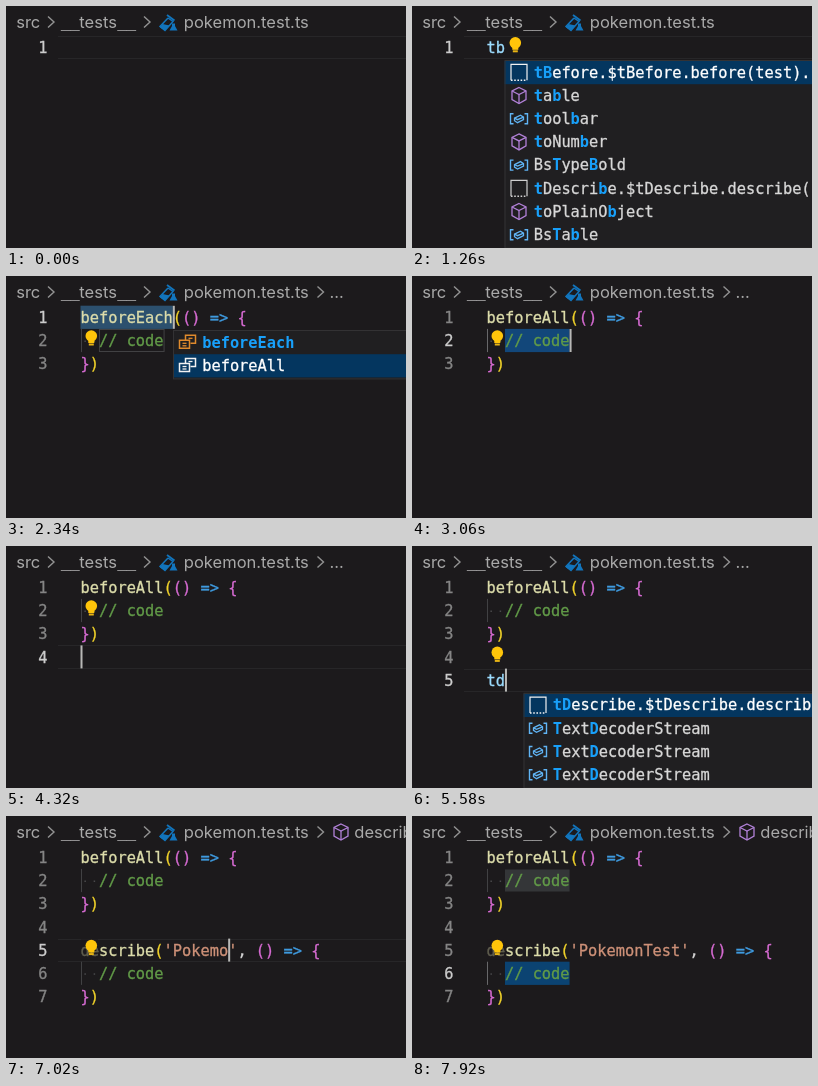
Animation of 400x242 px, one loop 8000 ms. Source, as an HTML page with a canvas:

```html
<!DOCTYPE html>
<html lang="en">
<head>
<meta charset="utf-8">
<title>Test snippets</title>
<style>
html, body { margin: 0; width: 100%; height: 100%; overflow: hidden; background: #1c1a1c; }
canvas { display: block; width: 400px; height: 242px; }
</style>
</head>
<body>
<canvas id="stage"></canvas>
<script>
const LOOP = 8000;
const MONO = '15.33px "DejaVu Sans Mono", monospace';
const UI = '16.55px Inter, sans-serif';
const CW = 9.23, LH = 23.2, LEFT = 74.5;
const BG = '#1c1a1c';

const canvas = document.getElementById('stage');
const ratio = window.devicePixelRatio || 1;
canvas.width = 400 * ratio;
canvas.height = 242 * ratio;
const c = canvas.getContext('2d');

const midY = line => 41.3 + (line - 1) * LH;
const colX = col => LEFT + col * CW;

// drawing helpers
function text(s, x, y, color, font = MONO, align = 'left') {
  c.font = font;
  c.fillStyle = color;
  c.textAlign = align;
  c.fillText(s, x, y);
  if (font === MONO) {
    c.strokeStyle = color;
    c.lineWidth = 0.3;
    c.strokeText(s, x, y);
  }
}
function box(x, y, w, h, color) {
  c.fillStyle = color;
  c.fillRect(x, y, w, h);
}
function path(points, color, width = 1.3, close = false) {
  c.beginPath();
  points.forEach(([x, y]) => c.lineTo(x, y));
  if (close) c.closePath();
  c.strokeStyle = color;
  c.lineWidth = width;
  c.stroke();
}
function shape(points, color) {
  c.beginPath();
  points.forEach(([x, y]) => c.lineTo(x, y));
  c.fillStyle = color;
  c.fill();
}
function at(x, y, draw) {
  c.save();
  c.translate(x, y);
  draw();
  c.restore();
}

// icons, each centred on its own origin
function cube(color) {
  path([[0, -8], [7, -4.5], [7, 4], [0, 8], [-7, 4], [-7, -4.5]], color, 1.3, true);
  path([[-7, -4.5], [0, -1], [7, -4.5]], color, 1.3);
  path([[0, -1], [0, 8]], color, 1.3);
}
function variable(color) {
  path([[-5.5, -5], [-8.5, -5], [-8.5, 5], [-5.5, 5]], color, 1.4);
  path([[5.5, -5], [8.5, -5], [8.5, 5], [5.5, 5]], color, 1.4);
  path([[-4.5, -0.5], [1.5, -3.5], [4.5, -1.5], [4.5, 1], [-1.5, 4], [-4.5, 2]], color, 1.3, true);
  path([[-4.5, -0.5], [-1.5, 1], [4.5, -1.5]], color);
}
function snippet(color) {
  path([[-8, 8], [-8, -8], [8, -8], [8, 8]], color, 1.2);
  c.setLineDash([1.6, 1.6]);
  path([[-8, 8], [8, 8]], color, 1.5);
  c.setLineDash([]);
}
function choice(color) {
  path([[-2, -2], [-2, -7], [8, -7], [8, 1], [3, 1]], color, 1.5);
  path([[-8, -2], [2, -2], [2, 6], [-8, 6]], color, 1.5, true);
  path([[1, -4], [5, -4]], color);
  path([[-5, 1], [-1, 1]], color);
  path([[-5, 3.5], [-1, 3.5]], color);
}
function bulb() {
  c.beginPath();
  c.arc(0, -1.5, 5.8, 0, Math.PI * 2);
  c.fillStyle = '#ffc50a';
  c.fill();
  box(-3, 2.5, 6, 3, '#ffc50a');
  box(-2.5, 6, 5, 2, '#e8b414');
}
function beaker() {
  const blue = '#1275bd';
  path([[1, -4.5], [6, -1], [-2, 8], [-7, 4], [1, -4.5]], blue, 1.5);
  path([[0, -7.5], [7.5, -2]], blue, 1.8);
  shape([[-4.5, 1.5], [2.5, 3], [-2, 8], [-7, 5]], blue);
  shape([[5, 1], [8, 1], [8, 3.5], [10.5, 8], [2.5, 8], [5, 3.5]], blue);
}

const icons = { cube, variable, snippet, choice };
const tints = { cube: '#b180d7', variable: '#60b4f4', snippet: '#d0d0d0', choice: '#e08a2c' };

// icon, label and, where it differs from the query, the order of lit letters
const tbItems = [
  ['snippet', 'tBefore.$tBefore.before(test).'],
  ['cube', 'table'],
  ['variable', 'toolbar'],
  ['cube', 'toNumber'],
  ['variable', 'BsTypeBold'],
  ['snippet', 'tDescribe.$tDescribe.describe('],
  ['cube', 'toPlainObject'],
  ['variable', 'BsTable']
];
const stream = ['variable', 'TextDecoderStream', 'teds'];
const desItems = [['snippet', 'tDescribe.$tDescribe.describe('], stream, stream, stream];
const hooks = [['choice', 'beforeEach'], ['choice', 'beforeAll']];

// timeline: every step changes only the listed fields
const block = head => [head + '(() => {', '  // code', '})'];
const all = block('beforeAll');
const suite = name => [...all, '', `describe('${name}', () => {`, '  // code', '})'];
const list = (items, query, x, line, pick = 0) => ({ items, query, x, line, pick });
const tbList = q => list(tbItems, q, 92.5, 1);
const hookList = pick => list(hooks, 'beforeEach', 167, 1, pick);
const desList = q => list(desItems, q, 111.5, 5);

const steps = [
  [0, { lines: [''], row: 1, cur: null, sel: null, bulb: null, pop: null, crumb: '', mark: false }],
  [360, { cur: 0 }],
  [720, { lines: ['t'], cur: 1 }],
  [900, { pop: tbList('t') }],
  [1080, { lines: ['tb'], cur: 2, pop: tbList('tb') }],
  [1260, { cur: null, bulb: [103.3, 1] }],
  [1620, { lines: block('beforeEach'), cur: 10, sel: [1, 0, 10, '#2c506e'], bulb: null, pop: null, crumb: 'more' }],
  [1800, { bulb: [85.3, 2], pop: hookList(0) }],
  [2160, { pop: hookList(1) }],
  [2520, { lines: all, cur: 9, sel: null, pop: null }],
  [2700, { row: 2, cur: 9, sel: [2, 2, 9, '#12477a'] }],
  [3780, { sel: null }],
  [3960, { row: 3, cur: 2 }],
  [4140, { lines: [...all, ''], row: 4, cur: 0 }],
  [4500, { lines: [...all, '', ''], row: 5 }],
  [4860, { bulb: [85.3, 4] }],
  [5040, { lines: [...all, '', 't'], cur: 1, pop: desList('t') }],
  [5400, { lines: [...all, '', 'td'], cur: 2, pop: desList('td') }],
  [5760, { lines: [...all, '', 'tde'], cur: 3, pop: desList('tde') }],
  [5940, { lines: [...all, '', 'tdes'], cur: 4, pop: desList('tdes') }],
  [6480, { lines: suite(''), cur: 10, pop: null, bulb: null }],
  [6840, { bulb: [85.3, 5], crumb: 'describe' }],
  [7920, { row: 6, cur: null, sel: [6, 2, 9, '#0b4372'], mark: true }]
];

function stateAt(t) {
  const s = Object.assign({}, ...steps.filter(([start]) => start <= t).map(step => step[1]));
  if (t >= 6660) {
    const n = Math.min(11, 2 * (Math.floor((t - 6660) / 180) + 1));
    s.lines = suite('PokemonTest'.slice(0, n));
    if (s.row === 5) s.cur = 10 + n;
  }
  return s;
}

function chevron(x) {
  path([[x - 3, 10.5], [x + 3, 16], [x - 3, 21.5]], '#929292', 1.4);
}
function crumbs(kind) {
  const y = 21.5, gray = '#a9a9a9';
  text('src', 10.2, y, gray, UI);
  chevron(45);
  // wide underscores, as in the interface font
  text('__', 55, y - 0.5, gray);
  text('tests', 73.3, y, gray, UI);
  text('__', 111.5, y - 0.5, gray);
  chevron(141);
  at(161, 16.5, beaker);
  text('pokemon.test.ts', 177.8, y, gray, UI);
  if (kind) chevron(314.5);
  if (kind === 'more') text('...', 323.5, y, gray, UI);
  if (kind === 'describe') {
    at(335, 16, () => cube('#b180d7'));
    text('describe', 348.3, y, gray, UI);
  }
}

function code(lines) {
  const token = /\/\/.*|'[^']*'|\w+(?=\()|=>|[(){}]|\w+|,/g;
  let depth = 0;
  lines.forEach((line, i) => {
    for (const m of line.matchAll(token)) {
      const s = m[0];
      let color = '#9cdcfe';
      if (s.startsWith('//')) color = '#629b48';
      else if (s[0] === "'") color = '#ce9178';
      else if (s === '=>') color = '#3f9be0';
      else if (s === ',') color = '#d4d4d4';
      else if ('(){}'.includes(s)) {
        if (s === ')' || s === '}') depth--;
        color = ['#f0d22a', '#d66bd2'][depth % 2];
        if (s === '(' || s === '{') depth++;
      } else if (line[m.index + s.length] === '(') color = '#dcdcaa';
      text(s, colX(m.index), midY(i + 1) + 5.6, color);
    }
  });
}

// the letters of the query light up in order
function matched(label, query, x, y, selected) {
  let k = 0;
  [...label].forEach((ch, i) => {
    const hit = k < query.length && ch.toLowerCase() === query[k].toLowerCase();
    if (hit) k++;
    text(ch, x + i * CW, y, hit ? '#18a0fa' : selected ? '#fff' : '#d8d8d8', hit ? 'bold ' + MONO : MONO);
  });
}

function popup({ items, query, x, line, pick }) {
  const top = midY(line) + 12.7;
  const h = items.length * LH + 2;
  box(x, top, 401 - x, h, '#201f21');
  box(x, top + 1 + pick * LH, 401 - x, LH, '#04365f');
  c.strokeStyle = '#333234';
  c.lineWidth = 1;
  c.strokeRect(x + 0.5, top + 0.5, 410 - x, h);
  items.forEach(([kind, label, order], i) => {
    const y = top + 12.3 + i * LH;
    const white = i === pick;
    at(x + 14.5, y, () => icons[kind](white ? '#f2f2f2' : tints[kind]));
    let hits = order ? [...order].filter(ch => query.includes(ch)) : query;
    if (kind === 'choice' && label !== query) hits = '';
    matched(label, hits, x + 29.2, y + 5.3, white);
  });
}

function draw(t) {
  const s = stateAt(t);
  c.setTransform(ratio, 0, 0, ratio, 0, 0);
  box(0, 0, 400, 242, BG);
  crumbs(s.crumb);

  if (!s.sel) {
    const y = midY(s.row);
    box(52, Math.round(y - 11.5), 348, 1, '#272628');
    box(52, Math.round(y + 11), 348, 1, '#272628');
  }
  if (s.mark) box(colX(2), midY(2) - 11, 7 * CW, 22, '#343638');
  if (s.sel) {
    const [line, from, to, color] = s.sel;
    box(colX(from), midY(line) - 11.6, (to - from) * CW, LH, color);
    if (line === 1) {
      c.strokeStyle = '#414143';
      c.lineWidth = 1;
      c.strokeRect(colX(2) + 0.5, midY(2) - 11, 7 * CW, 22);
    }
  }

  s.lines.forEach((line, i) => {
    const y = midY(i + 1);
    text(i + 1, 41.5, y + 5.6, s.row === i + 1 ? '#cccccc' : '#858585', MONO, 'right');
    if (line.startsWith('  ')) {
      box(75, y - 11.6, 1, LH, s.row === i + 1 ? '#68686a' : '#414143');
      [0.5, 1.5].forEach(n => box(colX(n) - 0.7, y, 1.5, 1.5, '#49494b'));
    }
  });
  code(s.lines);

  if (s.cur !== null) box(colX(s.cur), midY(s.row) - 11.5, 2, 23, '#b8b8b6');
  if (s.bulb) {
    const [x, line] = s.bulb;
    const y = midY(line) - 3;
    if (line === 5) {
      c.globalAlpha = 0.65;
      box(75, y - 8, 17, 20, BG);
      c.globalAlpha = 1;
    }
    at(x, y, bulb);
  }
  if (s.pop) popup(s.pop);
}

const begin = performance.now();
function tick() {
  draw((performance.now() - begin) % LOOP);
  requestAnimationFrame(tick);
}
tick();
</script>
</body>
</html>
```
